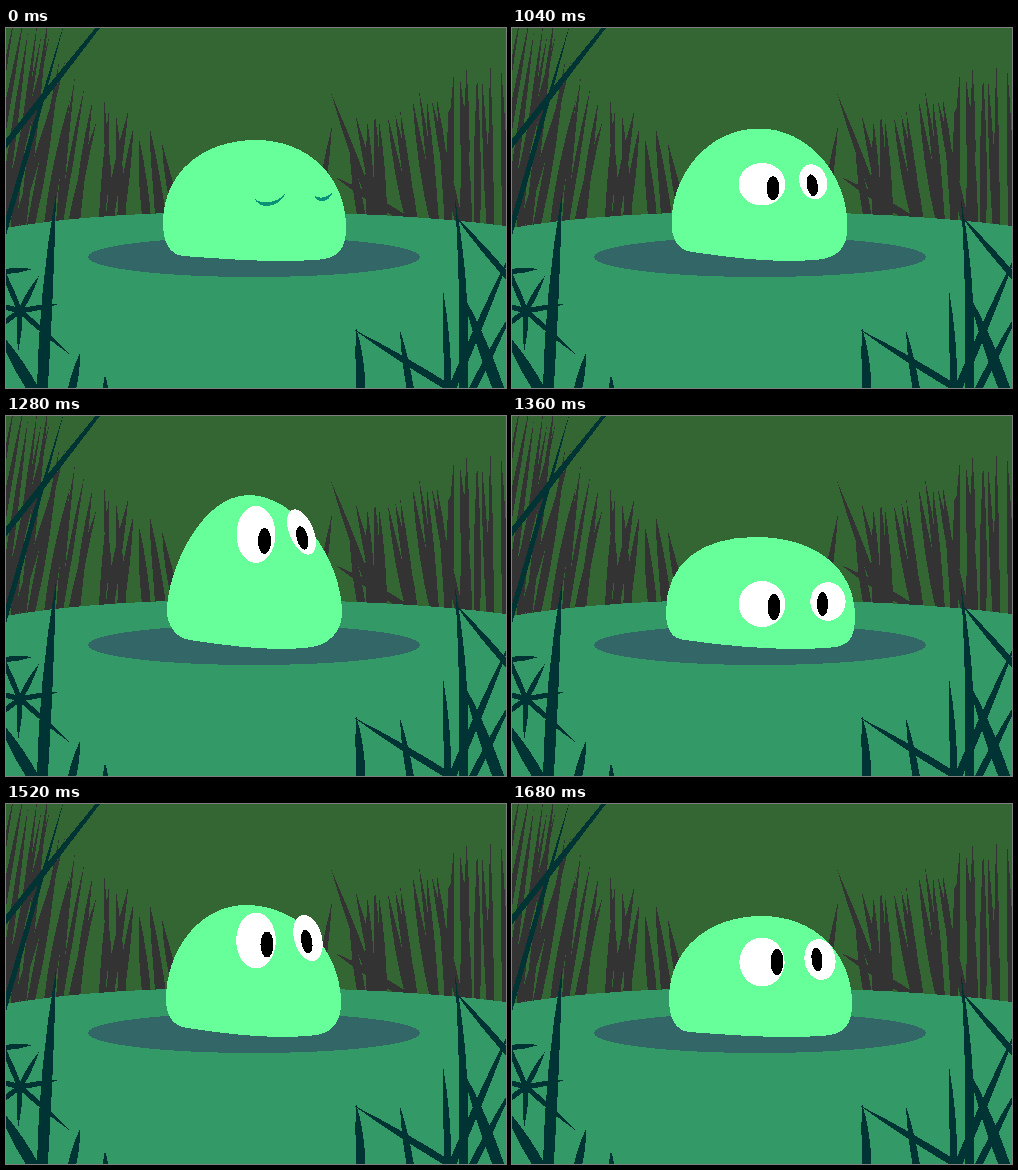
These frames come from a looping animation (500 by 360 pixels, 2320 ms). An HTML page:

```html
<!DOCTYPE html>
<html lang="en">
<head>
<meta charset="utf-8">
<title>Pond blob</title>
<style>
  html, body { margin: 0; width: 100%; height: 100%; overflow: hidden; background: #336633; }
  svg { display: block; width: 500px; height: 360px; }
</style>
</head>
<body>
<svg viewBox="0 0 500 360" shape-rendering="crispEdges">
  <rect width="500" height="360" fill="#336633"/>
  <path id="reeds" fill="#333333"/>
  <path d="M0 200C120 178 350 179 500 198V360H0Z" fill="#339966"/>
  <ellipse cx="248" cy="229" rx="166" ry="20" fill="#336666"/>
  <path id="body" fill="#66ff99"/>
  <path id="lids" fill="#0c9077"/>
  <g id="eyes">
    <ellipse fill="#fff"/><ellipse/>
    <ellipse fill="#fff"/><ellipse/>
  </g>
  <path id="grass" fill="#003333"/>
</svg>
<script>
const LOOP = 2320, STEP = 80, LOWER = 960, OPEN = 1040;
const $ = id => document.getElementById(id);
const mix = (a, b, k) => a + (b - a) * k;

let seed = 11;
function random(a, b) {
  seed = (seed * 16807) % 2147483647;
  return mix(a, b, seed / 2147483647);
}

// A leaf from its root to its tip, widest near the middle.
function blade(x0, y0, x1, y1, w, bend = 0) {
  const len = Math.hypot(x1 - x0, y1 - y0);
  const nx = (y1 - y0) / len, ny = (x0 - x1) / len;
  const mx = (x0 + x1) / 2, my = (y0 + y1) / 2;
  const at = (x, y, d) => `${(x + nx * d).toFixed(1)} ${(y + ny * d).toFixed(1)}`;
  return `M${at(x0, y0, w * .4)}Q${at(mx, my, bend + w * .6)} ${x1} ${y1}` +
    `Q${at(mx, my, bend - w * .6)} ${at(x0, y0, -w * .4)}Z`;
}

// Reeds with tips spread from one x to another along a sloping skyline.
function thicket(count, from, to, skyFrom, skyTo, leanFrom, leanTo) {
  let d = '';
  for (let i = 0; i < count; i++) {
    const k = i / (count - 1);
    const x = mix(from, to, k) + random(-3, 3);
    const y = mix(skyFrom, skyTo, k) + random(-18, 22);
    const lean = mix(leanFrom, leanTo, k) + random(-18, 18);
    d += blade(x - lean, 200, x, y, random(6, 10), random(-3, 3));
  }
  return d;
}
$('reeds').setAttribute('d',
  thicket(9, 12, 58, -14, 18, 42, 34) +
  thicket(14, 62, 156, 52, 124, 14, -4) +
  thicket(22, 345, 500, 108, 18, -8, -14) +
  blade(374, 200, 325, 65, 8) + blade(398, 190, 329, 149, 9) + blade(310, 200, 326, 98, 8));

// Foreground: leaves rising from the lower edge, crossing stems and a star of thin leaves.
const sprout = ([root, tip, top, w, bend]) => blade(root, 370, tip, top, w, bend);
const sprouts = [
  [36, 50, 165, 13, 3], [64, 74, 325, 9], [100, 99, 347, 6],
  [457, 449, 170, 10, -8], [442, 437, 262, 8, -2], [496, 457, 266, 13],
  [442, 506, 222, 9], [462, 508, 280, 8], [355, 350, 299, 10, -2], [406, 394, 302, 8]
];
let grass = sprouts.map(sprout).join('') +
  blade(-8, 126, 125, -42, 7) + blade(-8, 226, 58, -4, 6) +
  blade(-6, 244, 27, 241, 6) + blade(30, 366, -10, 300, 13) +
  blade(508, 256, 449, 188, 7) + blade(450, 364, 347, 301, 8);
for (let i = 0; i < 7; i++) {
  const a = -.18 + i * Math.PI / 3.5, r = i % 2 ? 66 : 40;
  grass += blade(14, 283, 14 + r * Math.cos(a), 283 + r * Math.sin(a), 6);
}
$('grass').setAttribute('d', grass);

const rest = { left: 157, right: 340, topX: 250, topY: 112, base: 228, eyeY: 158, eyeH: 24.5, gap: 58, look: 0 };
const pose = (left, right, topX, topY, eyeY, eyeH, gap, look) =>
  ({ left, right, topX, topY, base: 224, eyeY, eyeH, gap, look });
const keys = [
  [0, rest],
  [880, rest],
  [960, pose(158, 337, 251, 114, 184, 14, 54, 2)],
  [1120, pose(161, 334, 243, 87, 128.5, 28.5, 48.5, 6)],
  [1280, pose(161, 336, 243, 79, 118.5, 28.5, 45.5, 6.5)],
  [1360, pose(154, 343, 243, 121, 188, 23, 66, 3)],
  [1520, pose(160, 335, 240, 101, 136.5, 28, 52, 4)],
  [1680, rest],
  [LOOP, rest]
];

function poseAt(t) {
  const i = keys.findIndex(k => k[0] > t);
  const [t0, a] = keys[i - 1], [t1, b] = keys[i];
  const p = {};
  for (const name in a) p[name] = mix(a[name], b[name], (t - t0) / (t1 - t0));
  return p;
}

// Taller poses get straighter sides and rounder lower corners.
function outline({ left: l, right: r, topX: x, topY: y, base }) {
  const s = (112 - y) / 33, ly = 195, ry = 200 - 3 * s;
  return `M${l} ${ly}` +
    `C${l} ${mix(ly, y, .59 - .25 * s)} ${mix(x, l, .59)} ${y} ${x} ${y}` +
    `C${mix(x, r, .58 - .08 * s)} ${y} ${r} ${mix(ry, y, .58 - .12 * s)} ${r} ${ry}` +
    `C${r} ${221 - 5 * s} ${r - 8 - 6 * s} 230 ${r - 26 - 8 * s} 231.5` +
    `C${r - 65} 235 ${l + 75} 232 ${l + 20 + 3 * s} ${base}` +
    `C${l + 6 + 3 * s} ${base - 1.5} ${l} ${ly + 18 - 4 * s} ${l} ${ly}Z`;
}

function lid(x0, y0, x1, y1, depth) {
  const curve = (a, b, c, d, h) => `C${mix(a, c, .15)} ${b + h} ${mix(c, a, .15)} ${d + h} ${c} ${d}`;
  return `M${x0} ${y0}` + curve(x0, y0, x1, y1, depth) + curve(x1, y1, x0, y0, depth - 5);
}
const lidsHigh = lid(248, 169, 280, 164, 15) + lid(308, 166, 327, 163, 11.5);
const lidsLow = lid(249, 182, 282, 181, 14) + lid(309, 182, 328, 180, 12);

const [whiteL, pupilL, whiteR, pupilR] = $('eyes').children;
function oval(el, cx, cy, rx, ry, tilt = 0) {
  const attrs = { cx, cy, rx, ry, transform: `rotate(${tilt} ${cx} ${cy})` };
  for (const name in attrs) el.setAttribute(name, attrs[name]);
}

// Eyes keep their area; the far one narrows and tilts as it nears the other.
function drawEyes({ eyeY: y, eyeH: h, gap, look }) {
  const x = 250, far = x + gap, farY = y - 2.5, tilt = (gap - 66) * 1.1;
  const pupil = Math.min(1, h / 23);
  oval(whiteL, x, y, Math.min(23.5, 555 / h), h);
  oval(pupilL, x + 15 - look, y + look, 6.5, 13 * pupil);
  oval(whiteR, far, farY, 12 + (gap - 45) * .27, h * .84, tilt);
  oval(pupilR, far + (48 - gap) * .3, farY + look * .9, 5.5, 12 * pupil, tilt * .6);
}

function draw(t) {
  const p = poseAt(t);
  $('body').setAttribute('d', outline(p));
  $('lids').setAttribute('d', t < LOWER ? lidsHigh : t < OPEN ? lidsLow : '');
  $('eyes').style.display = t < OPEN ? 'none' : '';
  drawEyes(p);
}

const start = performance.now();
let shown = -1;
function tick() {
  const t = Math.floor((performance.now() - start) % LOOP / STEP) * STEP;
  if (t !== shown) draw(shown = t);
  requestAnimationFrame(tick);
}
tick();
</script>
</body>
</html>
```
